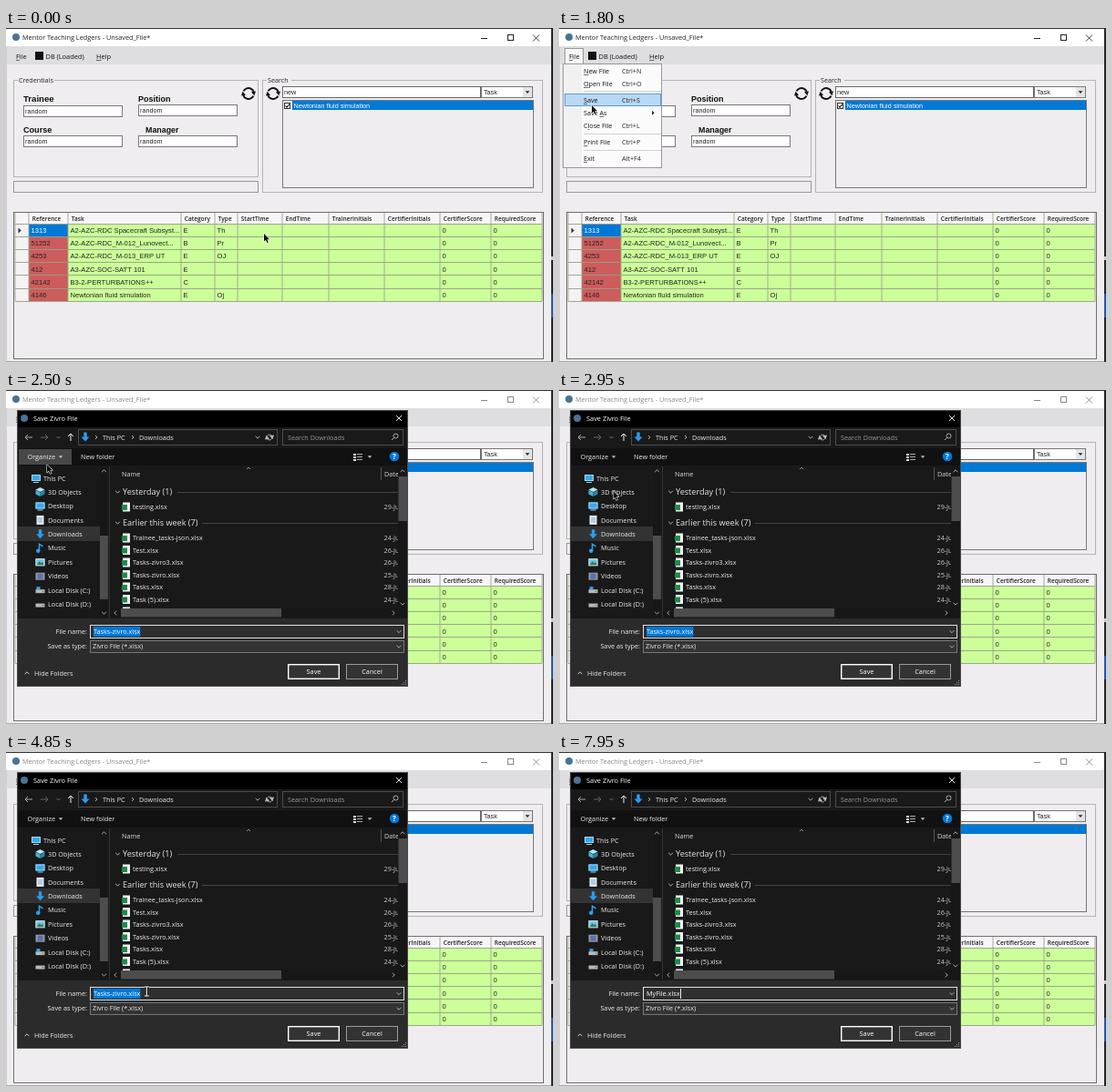
Write an HTML page with a canvas that moves like this. It is 600x367 px and loops after 8000 ms.

```html
<!DOCTYPE html>
<html lang="en">
<head>
<meta charset="utf-8">
<title>Saving a file</title>
<style>
html, body { margin: 0; width: 100%; height: 100%; overflow: hidden; background: #efedef; }
canvas { display: block; width: 100vw; height: 100vh; }
</style>
</head>
<body>
<canvas id="stage" width="600" height="367"></canvas>
<script>
const c = document.getElementById('stage').getContext('2d');
const LOOP = 8000;
const UI = '"Open Sans", sans-serif';
const SANS = '"Liberation Sans", Arial, sans-serif';
const BLUE = '#0078d7';
const FACE = '#efedef';
const APP = 'Mentor Teaching Ledgers';
const OLD_NAME = 'Tasks-zivro.xlsx';
const NEW_NAME = 'MyFile.xlsx';

const MENU_OPEN = 1250, MENU_CLOSE = 1950, DIALOG_OPEN = 2300;
const DESELECT = 3650, DRAG_START = 4600;
const TYPE_START = 5800, SUGGEST = 5900, TYPE_NEXT = 6150, KEY_GAP = 170;

// Pointer stops: time, x, y
const path = [
  [0, 283, 226], [250, 283, 226], [800, 92, 111], [1150, 17, 33],
  [1350, 17, 33], [1800, 36, 85], [2000, 36, 85], [2500, 45, 82],
  [2750, 45, 82], [3550, 137, 266], [4050, 137, 266], [4400, 95, 265],
  [DRAG_START, 95, 265], [5100, 213, 261], [LOOP, 213, 261]
];

// Speed through a stop; zero where the pointer rests
function speed(i, axis) {
  const a = path[i - 1], b = path[i], d = path[i + 1];
  if (!a || !d) return 0;
  const rests = [a, d].some(n => n[1] === b[1] && n[2] === b[2]);
  return rests ? 0 : (d[axis] - a[axis]) / (d[0] - a[0]);
}

function pointerAt(t) {
  let i = 0;
  while (i < path.length - 2 && t > path[i + 1][0]) i++;
  const p = path[i], q = path[i + 1], span = q[0] - p[0], u = (t - p[0]) / span;
  const e = u * u * (3 - 2 * u);
  const at = axis => p[axis] + (q[axis] - p[axis]) * e +
    span * u * (1 - u) * ((1 - u) * speed(i, axis) - u * speed(i + 1, axis));
  return { x: at(1), y: at(2) };
}

const within = (p, x0, y0, x1, y1) => p.x >= x0 && p.x <= x1 && p.y >= y0 && p.y <= y1;

function fill(x0, y0, x1, y1, color) {
  c.fillStyle = color;
  c.fillRect(x0, y0, x1 - x0, y1 - y0);
}

function box(x0, y0, x1, y1, bg, border, width = 1) {
  if (bg) fill(x0, y0, x1, y1, bg);
  c.strokeStyle = border;
  c.lineWidth = width;
  c.strokeRect(x0 + width / 2, y0 + width / 2, x1 - x0 - width, y1 - y0 - width);
}

function line(points, color, width = 1) {
  c.strokeStyle = color;
  c.lineWidth = width;
  c.beginPath();
  for (let i = 0; i < points.length; i += 2) c.lineTo(points[i], points[i + 1]);
  c.stroke();
}

function poly(points, color) {
  c.fillStyle = color;
  c.beginPath();
  for (let i = 0; i < points.length; i += 2) c.lineTo(points[i], points[i + 1]);
  c.closePath();
  c.fill();
}

function disc(x, y, r, color) {
  c.fillStyle = color;
  c.beginPath();
  c.arc(x, y, r, 0, 7);
  c.fill();
}

// y is the middle of the text line
function text(s, x, y, color = '#111', size = 7.25, family = UI, weight = 400, align = 'left') {
  c.font = `${weight} ${size}px ${family}`;
  c.fillStyle = color;
  c.textAlign = align;
  c.fillText(s, x, y + size * 0.36);
}

// Text with one underlined access key
function keyText(s, x, y, size, key = 0) {
  text(s, x, y, '#111', size);
  const from = x + c.measureText(s.slice(0, key)).width;
  fill(from, y + 4, from + c.measureText(s[key]).width, y + 4.7, '#333');
}

function chevron(x, y, dir, color = '#bbb', r = 2.4) {
  const a = { up: [-r, r / 2, 0, -r / 2, r, r / 2], down: [-r, -r / 2, 0, r / 2, r, -r / 2],
              left: [r / 2, -r, -r / 2, 0, r / 2, r], right: [-r / 2, -r, r / 2, 0, -r / 2, r] }[dir];
  line(a.map((v, i) => v + (i % 2 ? y : x)), color, 0.9);
}

function caretDown(x, y, color) {
  poly([x - 2.3, y - 1.2, x + 2.3, y - 1.2, x, y + 1.4], color);
}

function arrow(x, y, angle, len, color, width) {
  c.save();
  c.translate(x, y);
  c.rotate(angle);
  line([-len, 0, len, 0], color, width);
  line([len - 3, -3, len, 0, len - 3, 3], color, width);
  c.restore();
}

function refresh(x, y, r, color, width) {
  c.strokeStyle = color;
  c.lineWidth = width;
  for (const a of [0, Math.PI]) {
    c.save();
    c.translate(x, y);
    c.rotate(a);
    c.beginPath();
    c.arc(0, 0, r, -2.7, -0.35);
    c.stroke();
    poly([r - 3, -1.8, r + 2, -2.6, r + 0.4, 2.2], color);
    c.restore();
  }
}

function windowButtons(color) {
  line([521, 11.5, 528, 11.5], color);
  box(550, 7, 557, 14, null, color);
  line([578, 7.5, 585, 14.5], color, 0.9);
  line([585, 7.5, 578, 14.5], color, 0.9);
}

function group(x0, y0, x1, y1, label, labelEnd) {
  box(x0, y0, x1, y1, null, '#b4b4b4');
  fill(x0 + 5, y0 - 2, labelEnd, y0 + 3, FACE);
  text(label, x0 + 6, y0 + 0.5, '#222', 7.2);
}

function field(label, x, labelX, labelY, y, size) {
  text(label, labelX, labelY, '#111', size, SANS, 700);
  box(x, y, x + 109, y + 13, '#fff', '#777');
  text('random', x + 2, y + 6.3, '#222', 7.2, SANS);
}

const cols = [10, 25, 68, 192, 229, 254, 303, 354, 415, 476, 532, 588];
const heads = ['', 'Reference', 'Task', 'Category', 'Type', 'StartTime', 'EndTime',
  'TrainerInitials', 'CertifierInitials', 'CertifierScore', 'RequiredScore'];
const rows = [
  ['1313', 'A2-AZC-RDC Spacecraft Subsyst...', 'E', 'Th'],
  ['51252', 'A2-AZC-RDC_M-012_Lunovect...', 'B', 'Pr'],
  ['4253', 'A2-AZC-RDC_M-013_ERP UT', 'E', 'OJ'],
  ['412', 'A3-AZC-SOC-SATT 101', 'E', ''],
  ['42142', 'B3-2-PERTURBATIONS++', 'C', ''],
  ['4146', 'Newtonian fluid simulation', 'E', 'Oj']
];

function drawGrid() {
  const top = 215.5, step = 14.1, bottom = top + step * rows.length;
  box(8, 202, 590, 364, FACE, '#707070');
  fill(10, 203, 588, top, '#f7f5f7');
  fill(10, top, 25, bottom, '#f4f2f4');
  fill(25, top, 68, bottom, '#cd5c5c');
  fill(68, top, 588, bottom, '#ccff99');
  fill(25, top, 68, top + step, BLUE);
  heads.forEach((h, i) => text(h, cols[i] + 3.8, 209.5, '#222', 6.5, UI, 600));
  rows.forEach((r, i) => {
    const y = top + step * (i + 0.5);
    [...r, '', '', '', '', '0', '0'].forEach((s, j) =>
      text(s, cols[j + 1] + 2.5, y, j || i ? '#222' : '#fff', 7.6, SANS));
  });
  for (const x of cols) line([x, 203, x, bottom], '#9aa58a', 0.9);
  for (let i = 0; i <= rows.length; i++) {
    const y = Math.round(top + step * i - 0.5) + 0.5;
    line([10, y, 588, y], '#96a085', 0.9);
  }
  poly([13.5, 219.5, 16.8, 222.5, 13.5, 225.5], '#333');
}

function drawMain(active, p) {
  fill(0, 0, 600, 367, FACE);
  fill(0, 0, 600, 20, '#fff');
  fill(0, 0, 600, 1, '#333');
  disc(11, 10, 4, '#4a7396');
  text(APP + ' - Unsaved_File*', 18, 10.5, active ? '#222' : '#888', 7.3);
  windowButtons(active ? '#222' : '#888');

  fill(1, 20, 598, 40, '#dedddf');
  if (active && within(p, 6, 22, 27, 39)) box(6, 22, 27, 39, '#c4dcf0', '#8ab8dc');
  keyText('File', 11, 31, 7.4);
  fill(32, 26, 41, 35, '#111');
  text('DB (Loaded)', 43.5, 31, '#111', 7.4);
  keyText('Help', 99, 31, 7.4);

  group(8, 57, 277, 164, 'Credentials', 53);
  field('Trainee', 19, 19, 78, 85, 9.6);
  field('Position', 145, 145, 77.5, 84, 9);
  field('Course', 19, 19, 112, 118, 9.1);
  field('Manager', 145, 153, 112, 118, 8.9);
  refresh(266, 72, 6, '#111', 2);
  box(8, 168, 277, 181, FACE, '#999');

  group(281, 57, 589, 181, 'Search', 313);
  refresh(293, 72, 6, '#111', 2);
  box(303, 64, 521, 77, '#fff', '#666');
  text('new', 305, 70.2, '#222', 7.3, SANS);
  box(521, 64, 578, 77, '#fff', '#777');
  text('Task', 524, 70.5, '#222', 7.2, SANS);
  fill(567, 65, 577, 76, '#e4e4e4');
  caretDown(572, 70.5, '#222');
  box(303, 79, 579, 176, FACE, '#777');
  fill(314, 80, 578, 90, BLUE);
  box(305, 82, 312, 89, '#fff', '#333');
  line([306.5, 85.5, 308, 87.2, 311, 83.5], '#111', 1.1);
  text('Newtonian fluid simulation', 315.5, 85, '#fff', 7.2, SANS);

  drawGrid();
  fill(0, 20, 1, 367, '#d0d0d0');
  fill(598, 0, 600, 367, '#24242a');
  fill(598, 292, 600, 318, '#2456b8');
  fill(598, 251, 600, 255, '#ccc');
  fill(0, 366, 598, 367, '#aaa');
}

// Label, middle y, shortcut, access key index
const menu = [
  ['New File', 47, 'Ctrl+N', 0], ['Open File', 61, 'Ctrl+O', 0], ['Save', 79, 'Ctrl+S', 0],
  ['Save As', 93, '', 5], ['Close File', 107, 'Ctrl+L', 1], ['Print File', 125, 'Ctrl+P', 0],
  ['Exit', 143, 'Alt+F4', 0]
];

function drawMenu(p) {
  box(6, 22, 27, 40, '#f6f6f6', '#999');
  keyText('File', 11, 31, 7.4);
  box(4, 39, 113, 154, '#fbfbfb', '#999');
  fill(5, 40, 25, 153, '#f1f1f1');
  for (const y of [69.5, 116.5, 134.5]) line([27, y, 112, y], '#c8c8c8', 0.8);
  for (const [label, y, keys, key] of menu) {
    if (within(p, 5, y - 7, 112, y + 7)) box(6, y - 7, 112, y + 7, '#b9d9f3', '#4da0de');
    keyText(label, 27, y, 7.2, key);
    text(keys, 69, y, '#222', 7.2);
  }
  poly([102, 90.7, 104.6, 93.2, 102, 95.7], '#222');
}

function sideIcon(kind, x, y) {
  if (kind === 'screen') {
    box(x - 5, y - 4, x + 5, y + 3, '#37a8ea', '#9fdcff');
    fill(x - 3, y + 4, x + 3, y + 5, '#9fdcff');
  } else if (kind === 'cube') {
    poly([x, y - 5, x + 5, y - 2.5, x, y, x - 5, y - 2.5], '#b6e6f5');
    poly([x - 5, y - 2, x, y + 0.5, x, y + 5, x - 5, y + 2.5], '#49b2d2');
    poly([x + 5, y - 2, x, y + 0.5, x, y + 5, x + 5, y + 2.5], '#2888ab');
  } else if (kind === 'page') {
    fill(x - 4, y - 5, x + 4, y + 5, '#e4edf4');
    for (let i = -2; i < 4; i += 2) line([x - 2.5, y + i, x + 2.5, y + i], '#5c8db0', 0.7);
  } else if (kind === 'down') {
    poly([x - 1.7, y - 5, x + 1.7, y - 5, x + 1.7, y, x + 4.5, y, x, y + 5, x - 4.5, y, x - 1.7, y], '#2b9cf0');
  } else if (kind === 'note') {
    line([x - 1, y + 3, x - 1, y - 4.5, x + 3, y - 2], '#2ea3f2', 1.5);
    disc(x - 2.3, y + 3, 2.2, '#2ea3f2');
  } else if (kind === 'picture') {
    box(x - 5, y - 4, x + 5, y + 4, '#6cc4ec', '#e0e0e0');
    poly([x - 4, y + 3, x - 1, y - 1, x + 1, y + 1, x + 2.5, y - 0.5, x + 4, y + 3], '#2d7f55');
  } else if (kind === 'film') {
    fill(x - 5, y - 4, x + 5, y + 4, '#9a9a9a');
    fill(x - 3, y - 3, x + 3, y + 3, '#5b6fb5');
  } else {
    fill(x - 5, y - 1, x + 5, y + 3, '#b9b9b9');
    fill(x + 2, y + 0.5, x + 4, y + 1.5, '#3b9c4a');
    if (kind === 'system') fill(x - 4, y - 4, x, y - 1, '#2ea3f2');
  }
}

const places = [['3D Objects', 'cube'], ['Desktop', 'screen'], ['Documents', 'page'],
  ['Downloads', 'down'], ['Music', 'note'], ['Pictures', 'picture'], ['Videos', 'film'],
  ['Local Disk (C:)', 'system'], ['Local Disk (D:)', 'disk']];
const files = [['testing.xlsx', '29', 128.5], ['Trainee_tasks-json.xlsx', '24', 162.5],
  ['Test.xlsx', '26', 176], ['Tasks-zivro3.xlsx', '26', 189.5], ['Tasks-zivro.xlsx', '25', 203],
  ['Tasks.xlsx', '28', 216.5], ['Task (5).xlsx', '24', 230], ['', '', 243.5]];

function drawSidebar() {
  fill(12, 150, 103, 166, '#333');
  sideIcon('screen', 33, 97);
  text('This PC', 41, 97, '#eee');
  places.forEach(([name, kind], i) => {
    const y = 112 + 15.45 * i;
    sideIcon(kind, 37.5, y);
    text(name, 46, y, '#eee');
  });
  fill(103, 84, 112, 250, '#171717');
  fill(103, 160, 112, 230, '#4d4d4d');
  chevron(107.5, 89, 'up');
  chevron(107.5, 245, 'down');
  line([113.5, 84, 113.5, 250], '#333');
}

function drawFiles() {
  c.save();
  c.beginPath();
  c.rect(114, 83, 316, 157);
  c.clip();
  text('Name', 127, 92, '#ddd');
  line([411.5, 85, 411.5, 99], '#555');
  text('Date modified', 415, 92, '#ddd');
  chevron(266, 86, 'up', '#999', 2);
  for (const [label, y, end] of [['Yesterday (1)', 112, 188], ['Earlier this week (7)', 146, 215]]) {
    chevron(122.5, y, 'down', '#ccc', 2.3);
    text(label, 128, y, '#e4e4e4', 9.1);
    line([end, y + 0.5, 430, y + 0.5], '#444');
  }
  for (const [name, day, y] of files) {
    fill(128, y - 5, 136, y + 5, '#f2f2f2');
    fill(127, y - 2.5, 133, y + 3.5, '#1f8a4c');
    text(name, 139, y, '#eee');
    if (day) text(day + '-Jun', 414.5, y, '#ccc');
  }
  c.restore();
  fill(430, 84, 440, 250, '#171717');
  fill(430.5, 95, 440, 144, '#4d4d4d');
  chevron(435, 89, 'up');
  chevron(435, 235, 'down');
  fill(114, 240, 430, 250, '#171717');
  fill(126, 240, 302, 249.5, '#4d4d4d');
  chevron(120, 245, 'left');
  chevron(425, 245, 'right');
}

function grip(x, y) {
  for (let i = 0; i < 3; i++)
    for (let j = 0; j <= i; j++) fill(x + i * 2, y + 4 - j * 2, x + i * 2 + 1, y + 5 - j * 2, '#999');
}

function drawNameField(t, p) {
  box(92, 258, 437, 273, '#2f2f2f', '#e0e0e0');
  const typed = t < TYPE_START ? 0 : t < TYPE_NEXT ? 1 : 2 + Math.floor((t - TYPE_NEXT) / KEY_GAP);
  const name = typed ? NEW_NAME.slice(0, typed) : OLD_NAME;
  c.font = `400 7.25px ${UI}`;
  const widthTo = n => c.measureText(name.slice(0, n)).width;

  let selected = t < DESELECT ? name.length : 0;
  if (!typed && t >= DRAG_START)
    while (selected < name.length && 96 + widthTo(selected + 1) < p.x) selected++;
  if (selected) fill(96, 260, 96 + widthTo(selected), 271, BLUE);

  const blinkFrom = typed ? TYPE_NEXT + KEY_GAP * (NEW_NAME.length - 2) : DESELECT;
  const shown = t < blinkFrom || Math.floor((t - blinkFrom) / 530) % 2 === 0;
  const caret = 96.5 + widthTo(typed || OLD_NAME.indexOf('.'));
  text(name, 96, 265.3, '#fff');
  if (!selected && shown) fill(caret, 260, caret + 0.9, 271, '#fff');
  chevron(431, 265.5, 'down');
}

function drawSuggestions() {
  box(94, 272, 425, 321, '#2b2b2b', '#777');
  ['Maliyyə-Muəssisənin əsas maliyyə planlaşdırılması.pdf.pdf', APP + ' app', APP + ' app.rar']
    .forEach((s, i) => text(s, 98, 277.3 + 12.2 * i, '#eee', 7.3));
  grip(418, 313);
}

function drawDialog(t, p) {
  fill(12, 22, 441, 326, '#191919');
  fill(12, 22, 441, 41, '#000');
  disc(20, 31, 4, '#4a7396');
  text('Save Zivro File', 30, 31, '#fff', 7.4);
  line([428, 28, 434, 34], '#fff', 0.9);
  line([434, 28, 428, 34], '#fff', 0.9);

  arrow(25, 52, Math.PI, 4, '#aaa', 1);
  arrow(42, 52, 0, 4, '#666', 1);
  chevron(57.5, 52, 'down', '#777', 2);
  arrow(71, 52, -Math.PI / 2, 4, '#eee', 1);
  box(79, 43, 298, 61, '#191919', '#4c4c4c');
  sideIcon('down', 87, 51.5);
  chevron(99, 52, 'right', '#ccc', 1.9);
  text('This PC', 106, 52, '#eee');
  chevron(139, 52, 'right', '#ccc', 1.9);
  text('Downloads', 146, 52, '#eee');
  chevron(276, 52, 'down');
  refresh(289, 52, 3, '#bbb', 0.8);
  box(303, 43, 436, 61, '#191919', '#4c4c4c');
  text('Search Downloads', 309, 52, '#999');
  c.strokeStyle = '#bbb';
  c.lineWidth = 0.9;
  c.beginPath();
  c.arc(427.5, 50.5, 2.5, 0, 7);
  c.stroke();
  line([425.5, 52.5, 423, 55], '#bbb');

  fill(12, 64, 441, 83, '#111');
  if (within(p, 14, 65, 71, 83)) fill(14, 65, 72, 82, '#484848');
  text('Organize', 23.5, 73, '#eee', 7.3);
  caretDown(60, 73.5, '#bbb');
  text('New folder', 82, 73, '#eee', 7.3);
  for (let y = 70; y < 78; y += 3) {
    fill(381, y, 384, y + 2, '#ddd');
    fill(385, y, 391, y + 1, '#aaa');
  }
  caretDown(399, 73.5, '#bbb');
  disc(426, 73, 5.3, BLUE);
  text('?', 426, 73, '#fff', 8, UI, 700, 'center');

  drawSidebar();
  drawFiles();

  fill(12, 251, 441, 326, '#2b2b2b');
  text('File name:', 89, 265.3, '#eee', 7.25, UI, 400, 'right');
  text('Save as type:', 89, 281.3, '#eee', 7.25, UI, 400, 'right');
  c.textAlign = 'left';
  drawNameField(t, p);
  box(92, 275, 437, 289, '#333', '#777');
  text('Zivro File (*.xlsx)', 95, 281.5, '#eee');
  chevron(431, 282, 'down');
  chevron(23, 311, 'up', '#ddd');
  text('Hide Folders', 31, 311, '#eee');
  box(309, 301, 366, 318, '#333', '#fff', 1.4);
  text('Save', 337.5, 309.5, '#fff', 7.3, UI, 400, 'center');
  box(373, 301, 430, 318, '#333', '#9b9b9b');
  text('Cancel', 401.5, 309.5, '#fff', 7.3, UI, 400, 'center');
  grip(434, 319);
  if (t >= SUGGEST && t < TYPE_NEXT) drawSuggestions();
  c.strokeStyle = '#4a4a4a';
  c.lineWidth = 1;
  c.strokeRect(12.5, 22.5, 428, 303);
}

function drawPointer(p, beam) {
  c.save();
  c.translate(p.x, p.y);
  if (beam) {
    for (const [color, width] of [['#111', 2.4], ['#f4f4f4', 1.1]]) {
      line([0, -5, 0, 5], color, width);
      line([-2.5, -5, 2.5, -5], color, width);
      line([-2.5, 5, 2.5, 5], color, width);
    }
  } else {
    const shape = [0, 0, 0, 9.8, 2.2, 7.8, 3.9, 11.4, 5.4, 10.7, 3.8, 7.2, 6.8, 7];
    c.scale(0.88, 0.88);
    c.lineJoin = 'round';
    line([...shape, 0, 0], '#fff', 1.2);
    poly(shape, '#0a0a0a');
  }
  c.restore();
}

function draw(t) {
  const p = pointerAt(t);
  const dialog = t >= DIALOG_OPEN;
  drawMain(!dialog, p);
  if (t >= MENU_OPEN && t < MENU_CLOSE) drawMenu(p);
  if (dialog) drawDialog(t, p);
  // The pointer hides while typing
  if (t < TYPE_NEXT) drawPointer(p, dialog && within(p, 92, 257, 437, 273));
}

const start = performance.now();
function tick() {
  draw((performance.now() - start) % LOOP);
  requestAnimationFrame(tick);
}
tick();
</script>
</body>
</html>
```
